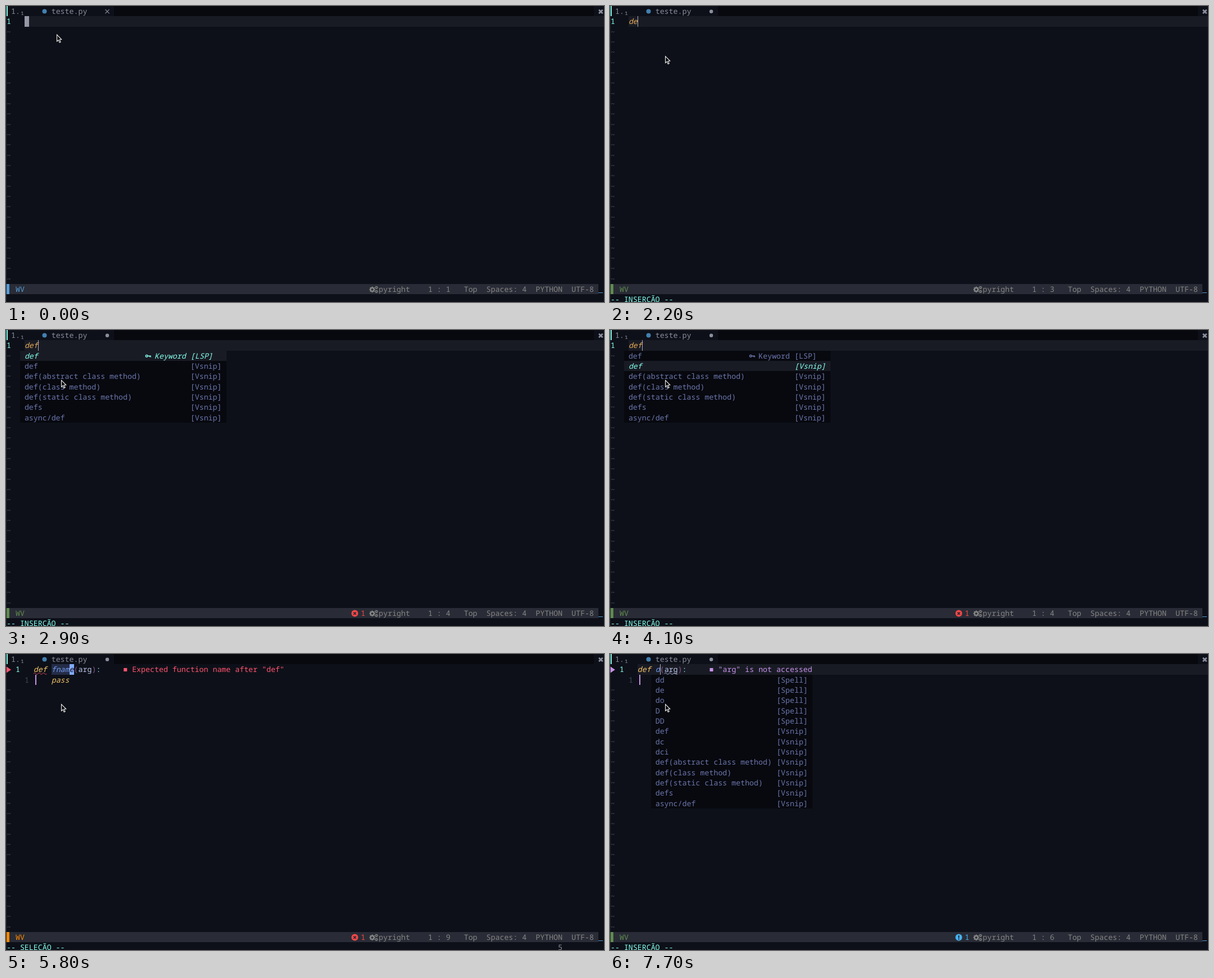
Animation, 1063 px wide and 527 px high, one loop 8 s. Source, as an HTML page with a canvas:

```html
<!DOCTYPE html>
<html lang="pt">
<head>
<meta charset="utf-8">
<title>Editor completion</title>
<style>
html, body { margin: 0; width: 100%; height: 100%; overflow: hidden; background: #0d1018; }
canvas { display: block; }
</style>
</head>
<body>
<canvas id="stage" width="1063" height="527"></canvas>
<script>
const ctx = document.getElementById('stage').getContext('2d');
const LOOP = 8000, W = 1063, H = 527;
const CW = 7.97, RH = 18.335;
const C = {
  bg: '#0d1018', dark: '#08090f', line: '#191b24', status: '#292c36',
  menu: '#6b76ac', accent: '#84ffee', dim: '#414658', text: '#8a8e9d',
  grey: '#858585', blue: '#569cd6', green: '#608b4e', orange: '#ff8800',
  red: '#ff5370', statusRed: '#f44747', info: '#45b0f0', hint: '#c792ea',
  gold: '#f5c56a', amber: '#e8ac58', fn: '#7199ec', paren: '#8c5a92',
  arg: '#b9c4ea', colon: '#89ddff', beam: '#a9abb8'
};
const MENU = [
  ['def(abstract class method)', 'Vsnip'], ['def(class method)', 'Vsnip'],
  ['def(static class method)', 'Vsnip'], ['defs', 'Vsnip'], ['async/def', 'Vsnip']
];
const DEF_MENU = [['def', 'LSP'], ['def', 'Vsnip'], ...MENU];
const D_MENU = [
  ...['dd', 'de', 'do', 'D', 'DD'].map(w => [w, 'Spell']),
  ...['def', 'dc', 'dci'].map(w => [w, 'Vsnip']), ...MENU
];

const colX = c => 1 + c * CW;
const rowY = r => r * RH;

function rect(x, y, w, h, color) {
  ctx.fillStyle = color;
  ctx.fillRect(x, y, w, h);
}

// Fills grid cells, snapped to whole pixels.
function cells(c0, c1, r0, r1, color) {
  const x = Math.round(colX(c0)), y = Math.round(rowY(r0));
  rect(x, y, Math.round(colX(c1)) - x, Math.round(rowY(r1)) - y, color);
}

function text(s, col, row, color, italic) {
  ctx.font = (italic ? 'italic ' : '') + '13.28px "Noto Sans Mono", monospace';
  ctx.fillStyle = color;
  ctx.fillText(s, colX(col), rowY(row) + 14);
}

function disc(x, y, r, color) {
  ctx.fillStyle = color;
  ctx.beginPath();
  ctx.arc(x, y, r, 0, Math.PI * 2);
  ctx.fill();
}

function path(points, close) {
  ctx.beginPath();
  points.forEach(([x, y]) => ctx.lineTo(x, y));
  if (close) ctx.closePath();
}

function stroke(color, width) {
  ctx.strokeStyle = color;
  ctx.lineWidth = width;
  ctx.stroke();
}

function cross(x, y, r, color, width) {
  ctx.beginPath();
  ctx.moveTo(x - r, y - r); ctx.lineTo(x + r, y + r);
  ctx.moveTo(x + r, y - r); ctx.lineTo(x - r, y + r);
  stroke(color, width);
}

function gear(x, y, r, teeth) {
  ctx.beginPath();
  for (let i = 0; i < teeth; i++) {
    const a = i / teeth * Math.PI * 2, dx = Math.cos(a), dy = Math.sin(a);
    ctx.moveTo(x + dx * r * 0.6, y + dy * r * 0.6);
    ctx.lineTo(x + dx * r, y + dy * r);
  }
  stroke(C.grey, r * 0.4);
  ctx.beginPath();
  ctx.arc(x, y, r * 0.58, 0, Math.PI * 2);
  stroke(C.grey, r * 0.42);
}

function key(x, y, color) {
  ctx.beginPath();
  ctx.arc(x, y, 1.8, 0, Math.PI * 2);
  stroke(color, 1.4);
  path([[x + 2, y], [x + 7, y], [x + 7, y + 2.2]]);
  stroke(color, 1.4);
  path([[x + 5, y], [x + 5, y + 2]]);
  stroke(color, 1.2);
}

function curl(c0, c1, row, color) {
  const pts = [], y = rowY(row) + 16.6;
  for (let x = colX(c0); x <= colX(c1); x += 0.5)
    pts.push([x, y - Math.sin((x - colX(c0)) / CW * Math.PI * 2) * 1.2]);
  path(pts);
  stroke(color, 1);
}

function beam(col) {
  rect(Math.round(colX(col)), 18, 1, 19, C.beam);
}

function tabline(modified) {
  rect(0, 0, W, 18, C.dark);
  cells(0, 24, 0, 1, C.bg);
  cells(131, 134, 0, 1, C.bg);
  rect(1, 0, 2, 18, C.accent);
  text('1.', 1, 0, C.text);
  text('₁', 3, 0, C.text);
  disc(68.5, 9.5, 4, '#437fb0');
  text('teste.py', 10, 0, C.text);
  if (modified) disc(180, 9.8, 3.2, C.text);
  else cross(180, 9.8, 3.6, C.text, 1.2);
  cross(1057.3, 10, 3.3, C.text, 2.8);
}

function statusline(color, pos, badge) {
  cells(0, 132, 27, 28, C.status);
  rect(1, 495, 5, 18, color);
  text('WV', 2, 27, color);
  if (badge) {
    const tint = badge === 'error' ? C.statusRed : C.info;
    disc(620, 504.6, 6, tint);
    if (badge === 'error') cross(620, 504.6, 2.2, C.status, 1.7);
    else {
      rect(619, 501, 2, 4.6, C.status);
      rect(619, 506.6, 2, 2, C.status);
    }
    text('1', 79, 27, tint);
  }
  gear(651, 504.8, 5.2, 8);
  gear(658.5, 501.2, 2.9, 6);
  gear(658.5, 508.2, 2.9, 6);
  text('pyright', 83, 27, C.grey);
  text('1 : ' + pos, 94, 27, C.grey);
  text('Top', 102, 27, C.grey);
  text('Spaces: 4', 107, 27, C.grey);
  text('PYTHON', 118, 27, C.grey);
  text('UTF-8', 126, 27, C.grey);
  rect(1053, 510, 8, 1, C.blue);
}

function popup(items, col, width, tagCol, selected) {
  cells(col, col + width, 2, 2 + items.length, C.dark);
  items.forEach(([word, tag], i) => {
    const row = 2 + i, on = i === selected, color = on ? C.accent : C.menu;
    if (on) cells(col, col + width, row, row + 1, C.line);
    text(word, col + 1, row, color, on);
    text('[' + tag + ']', tagCol, row, color, on);
    if (tag === 'LSP') {
      key(colX(31) + 2, rowY(row) + 9.6, color);
      text('Keyword', 33, row, color, on);
    }
  });
}

function signature(name, col, row) {
  const end = col + 4 + name.length;
  text('def', col, row, C.gold, true);
  text(name, col + 4, row, C.fn, true);
  text('(', end, row, C.paren);
  text('arg', end + 1, row, C.arg);
  text(')', end + 4, row, C.paren);
  text(':', end + 5, row, C.colon);
  return end + 6;
}

function snippetDoc() {
  cells(49, 66, 2, 4, C.dark);
  signature('fname', 50, 2);
  rect(395, 55, 1, 18, C.dim);
  text('pass', 54, 3, C.gold, true);
}

function diagnostic(message, color, endCol) {
  path([[1, 22.5], [9, 28], [1, 33.5]], true);
  ctx.fillStyle = color;
  ctx.fill();
  rect(colX(endCol + 5) + 1, 25, 6, 6, color);
  text(message, endCol + 7, 1, color);
}

function snippet(t) {
  const typing = t >= 7700, failing = t < 6100;
  const name = typing ? 'd' : 'fname';
  if (typing) cells(6, 134, 1, 2, C.line);
  else cells(10, 14, 1, 2, '#242c47');
  text('1', 2, 1, C.accent);
  text('1', 4, 2, C.dim);
  const end = signature(name, 6, 1);
  if (!typing) {
    cells(14, 15, 1, 2, '#82aaff');
    text('e', 14, 1, C.bg, true);
  }
  if (failing) {
    curl(6, 9, 1, C.red);
    diagnostic('Expected function name after "def"', C.red, end);
  } else {
    curl(end - 5, end - 2, 1, C.arg);
    diagnostic('"arg" is not accessed', C.hint, end);
  }
  rect(52, 37, 2, 18, C.hint);
  text('pass', 10, 2, C.gold, true);
  if (typing) {
    beam(11);
    popup(D_MENU, 9, 36, 37, -1);
  }
}

function typed(t) {
  const word = t < 2200 ? '' : t < 2300 ? 'de' : 'def';
  cells(4, 134, 1, 2, C.line);
  text('1', 0, 1, C.accent);
  text(word, 4, 1, C.amber, true);
  if (t < 1200) cells(4, 5, 1, 2, '#9698a8');
  else beam(4 + word.length);
  if (t >= 2300) popup(DEF_MENU, 3, 46, 41, t < 2900 ? -1 : t < 4100 ? 0 : 1);
  if (t >= 4300) snippetDoc();
  return word.length + 1;
}

function pointer(t) {
  const step = Math.max(0, Math.min(3, Math.floor(t / 100) - 2)) / 3;
  ctx.save();
  ctx.translate(90.5 + 8 * step, 51.2 + 38.3 * step);
  path([[0, 0], [0, 11.8], [2.7, 9.4], [4.7, 13.8], [6.6, 13], [4.7, 8.7], [8.2, 8.4]], true);
  ctx.fillStyle = '#07080c';
  ctx.fill();
  stroke('#f2f2f2', 1.1);
  ctx.restore();
}

function draw(t) {
  rect(0, 0, W, H, C.bg);
  rect(0, 0, 1, H, '#1c2029');
  ctx.textRendering = 'geometricPrecision';
  ctx.textBaseline = 'alphabetic';
  tabline(t >= 2200);
  const expanded = t >= 5800, selecting = expanded && t < 7700;
  for (let r = expanded ? 3 : 2; r <= 26; r++) text('~', 0, r, C.dim);

  let pos;
  if (expanded) {
    snippet(t);
    pos = selecting ? 9 : 6;
  } else pos = typed(t);

  const color = t < 1200 ? C.blue : selecting ? C.orange : C.green;
  const badge = t < 2500 ? '' : t < 6100 ? 'error' : 'info';
  statusline(color, pos, badge);
  if (t >= 1200) text(selecting ? '-- SELEÇÃO --' : '-- INSERÇÃO --', 0, 28, C.accent);
  if (selecting) text('5', 123, 28, C.text);
  pointer(t);
}

const start = performance.now();
function tick() {
  draw((performance.now() - start) % LOOP);
  requestAnimationFrame(tick);
}
tick();
</script>
</body>
</html>
```
